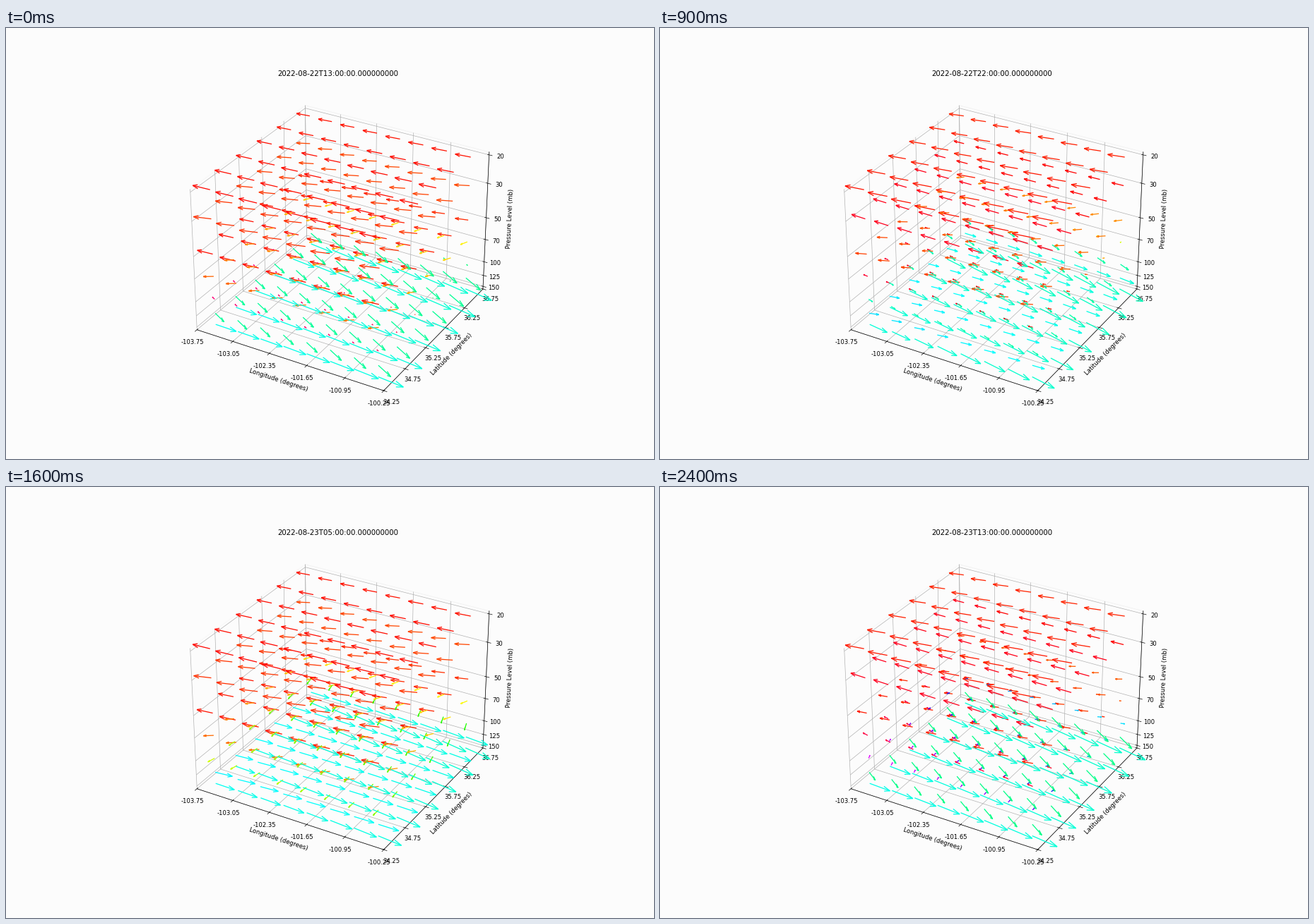
A matplotlib script that plays this animation: 917x611 px, repeating every 2.5 s.

```python
import numpy as np
import matplotlib.pyplot as plt
from matplotlib.animation import FuncAnimation

W, H, DPI = 917, 611, 61.133
FRAMES, INTERVAL = 25, 100
LON, LAT = (-103.75, -100.25), (34.25, 36.75)
ARROW = 0.0133  # degrees of arrow per unit of wind

# Vertical profile: steady zonal wind, plus a wave with its strength
# and starting direction on each pressure level.
LEVELS = np.array([20, 30, 50, 70, 100, 125, 150])
ZONAL = np.array([-25.6, -22, -16.5, -7, 5, 25.5, 39.5])
SWING = np.array([1, 3, 5, 4, 8, 7.7, 2])
PHASE = np.radians([60, -94, 173, -116, 146, -68, 40])
SPIN = np.radians(np.where(LEVELS < 100, -22, -16.3))  # per hour


def padded(lo, hi, scale):
    pad = (hi - lo) * (scale - 1) / 2
    return lo - pad, hi + pad


def height(p):
    return 24 * p ** -0.05


def edge_ticks(lim, span):
    return np.linspace(*lim, 6), [f"{t:.2f}" for t in np.linspace(*span, 6)]


xlim = padded(*LON, 1.1 * 25 / 24)
ylim = padded(*LAT, 1.1 * 25 / 24)
zlim = padded(height(150), height(20), 25 / 24)

fig = plt.figure(figsize=((W + 1e-6) / DPI, (H + 1e-6) / DPI), dpi=DPI,
                 facecolor="#fcfcfc")
ax = fig.add_subplot(projection="3d")
ax.set_facecolor("none")
for axis in (ax.xaxis, ax.yaxis, ax.zaxis):
    axis.pane.set_fill(False)
ax.set_xlim(*xlim)
ax.set_ylim(*ylim)
ax.set_zlim(*zlim)
ax.set_xticks(*edge_ticks(xlim, LON))
ax.set_yticks(*edge_ticks(ylim, LAT))
ax.set_zticks(height(LEVELS), [str(p) for p in LEVELS])
ax.set_xlabel("Longitude (degrees)")
ax.set_ylabel("Latitude (degrees)")
ax.set_zlabel("Pressure Level (mb)")

Z, Y, X = np.meshgrid(height(LEVELS), np.linspace(*LAT, 6),
                      np.linspace(*LON, 8), indexing="ij")
east = (X - np.mean(LON)) / (np.ptp(LON) / 2)
north = (Y - np.mean(LAT)) / (np.ptp(LAT) / 2)

# Steady shear across the region, growing from the top level to the lowest.
depth = ((LEVELS - 20) / 130)[:, None, None]
shear = (east * (-1 + 4 * depth - 1.3j * depth)
         + north * (3 - 1j * (0.3 + 1.6 * depth)))


def wind(hour):
    """Complex wind u + iv: mean flow, shear and a clockwise-turning wave."""
    mean = ZONAL - 1j * (2 + 0.02 * LEVELS)
    wave = SWING * np.exp(1j * (PHASE + SPIN * hour))
    return (mean + wave)[:, None, None] + shear


arrows = []


def draw(i):
    while arrows:
        arrows.pop().remove()
    w = wind(i)
    heading = (np.angle(w).ravel() + np.pi) / (2 * np.pi)
    colors = np.tile(plt.cm.hsv(heading), (3, 1))  # shafts, then both barbs
    arrows.append(ax.quiver(X, Y, Z, ARROW * w.real, ARROW * w.imag,
                            np.zeros(w.shape), colors=colors))
    day, hour = divmod(13 + i, 24)
    ax.set_title(f"2022-08-{22 + day}T{hour:02d}:00:00.000000000")
    return arrows


anim = FuncAnimation(fig, draw, frames=FRAMES, interval=INTERVAL,
                     repeat=True, repeat_delay=0)
plt.show()
```
